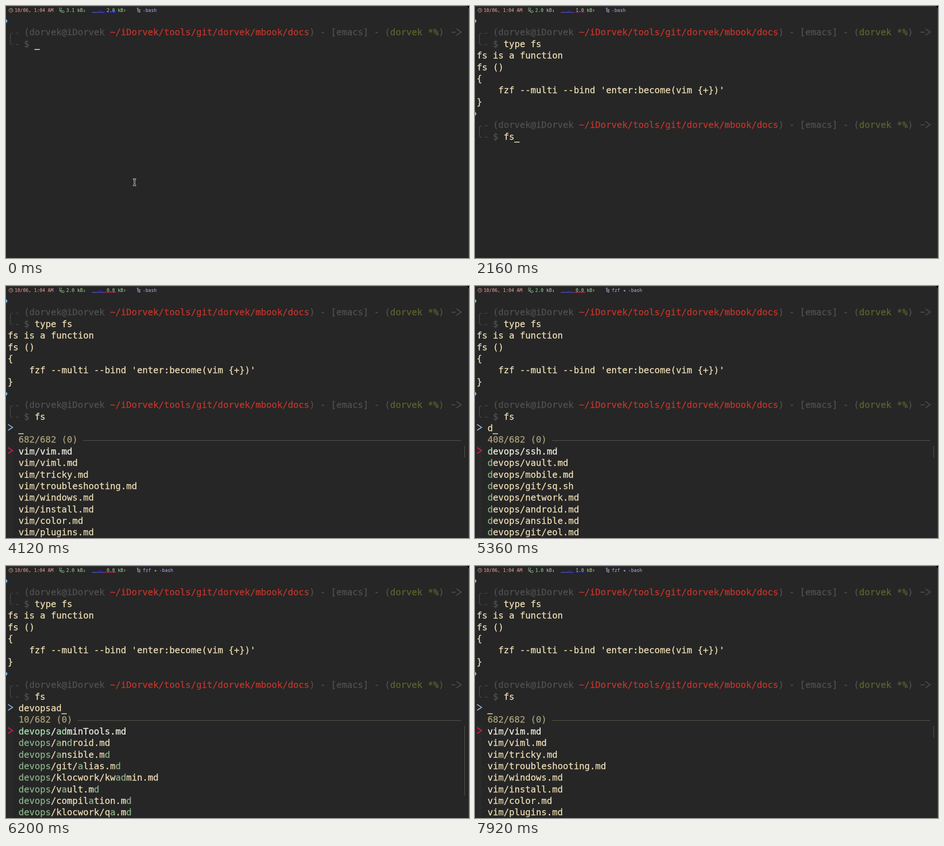
These frames come from a looping animation (1014x552 px, 8 s). An HTML page:

```html
<!DOCTYPE html>
<html lang="en">
<head>
<meta charset="utf-8">
<title>Terminal</title>
<style>
  html, body { margin: 0; width: 100%; height: 100%; overflow: hidden; background: #000; }
  svg { display: block; width: 1014px; height: 552px; }
  text { font: 19.6px "DejaVu Sans Mono", monospace; white-space: pre; stroke-width: .35px; }
  .small { font-size: 10.05px; stroke-width: 0; }
</style>
</head>
<body>
<svg id="stage" viewBox="0 0 1014 552"></svg>
<script>
const LOOP = 8000, CELL = 11.8, LEFT = 3.8, ROW = 25.37, BASE = 64.4;
const color = {
  back: '#262626', dim: '#505050', path: '#c0352b', branch: '#5f612d', text: '#ebdbb2',
  bright: '#ecece0', info: '#a8a077', match: '#87af87', matchBright: '#a9dfae',
  prompt: '#87afd7', pointer: '#d2185c', date: '#f3a69b', net: '#a6d9a0', job: '#b5b5ef', rule: '#5c5c50'
};

const vimFiles = ['vim', 'viml', 'tricky', 'troubleshooting', 'windows', 'install', 'color', 'plugins']
  .map(name => `vim/${name}.md`);
const opsFiles = ['ssh.md', 'vault.md', 'mobile.md', 'git/sq.sh', 'network.md', 'android.md', 'ansible.md', 'git/eol.md']
  .map(name => `devops/${name}`);
const adFiles = ['adminTools', 'android', 'ansible', 'git/alias', 'klocwork/kwadmin', 'vault', 'compilation', 'klocwork/qa']
  .map(name => `devops/${name}.md`);

// Each table holds [start in ms, value].
const typedFirst = [[0, ''], [240, 't'], [340, 'ty'], [430, 'typ'], [520, 'type'], [600, 'type '], [720, 'type f'], [800, 'type fs']];
const typedSecond = [[0, ''], [1960, 'f'], [2080, 'fs']];
const query = [[0, ''], [5000, 'd'], [5520, 'de'], [5640, 'dev'], [5720, 'devo'], [5800, 'devop'],
  [5880, 'devops'], [6000, 'devopsa'], [6120, 'devopsad'], [7760, '']];
const results = [[0, [682, vimFiles, 1]], [5040, [408, opsFiles, 1]], [5560, [226, opsFiles, 1]],
  [5680, [73, opsFiles, 1]], [5840, [64, opsFiles, 1]], [6040, [26, adFiles, 2]],
  [6160, [10, adFiles, 6]], [7800, [682, vimFiles, 1]]];
const network = [[0, ['3.1', '2.0', '#2323c8']], [480, ['1.0', '1.0', '#23237e']], [1480, ['2.0', '1.0', '#762160']],
  [2480, ['2.0', '0.0', '#c52b58']], [7360, ['1.0', '1.0', '#232391']]];
const ENTER_FIRST = 960, OUTPUT = 1040, PROMPT = 1240, ENTER_SECOND = 3680, FINDER = 3760, JOB = 4280;

const at = (table, t) => table.filter(step => step[0] <= t).pop()[1];
const col = n => LEFT + n * CELL;
const baseline = row => BASE + row * ROW;
const rect = (x, y, w, h, fill) => `<rect x="${x}" y="${y}" width="${w}" height="${h}" fill="${fill}"/>`;
const stroke = (d, tint, width = 1) => `<path d="${d}" fill="none" stroke="${tint}" stroke-width="${width}"/>`;
const text = (x, y, parts, cls = '') => `<text x="${x}" y="${y}" class="${cls}">` +
  parts.map(([tint, s]) => `<tspan fill="${tint}" stroke="${tint}">${s}</tspan>`).join('') + '</text>';
const line = (row, column, s, tint = color.text) => text(col(column), baseline(row), [[tint, s]]);
const small = (x, s, tint) => text(x, 13, [[tint, s]], 'small');
const cursor = (row, column) => rect(col(column) - .4, baseline(row) + 4.6, 11.6, 1.8, color.text);

function chrome() {
  return rect(0, 0, 1014, 552, '#000') +
    `<path d="M-2 .5H1004Q1013.5 .5 1013.5 10V554H-2Z" fill="${color.back}" stroke="#484848"/>`;
}

function statusBar(t) {
  const [down, up, tail] = at(network, t);
  return `<circle cx="10.8" cy="9.3" r="4.3" fill="none" stroke="${color.date}"/>` +
    stroke('M10.8 6.5V9.5H13', color.date) + small(19, '10/06, 1:04 AM', color.date) +
    stroke('M117 4.5h4.5v4H117zM122.5 10.5h4.5v4h-4.5zM119 9v3.5h3M116.5 10.5h5', '#82ad80') +
    small(132, `${down} kB↓`, color.net) +
    rect(188, 13.4, 27, 1.2, '#5d5ddd') + rect(215, 13.4, 27, 1.2, tail) +
    rect(203, 10, 5, 4, '#2222d2') + rect(211, 9.5, 1.5, 4.5, '#2222a0') +
    (t < 480 ? rect(231, 10, 3, 4, '#2222b8') + rect(236, 9, 4, 5, '#2222b8') : '') +
    small(220.5, `${up} kB↑`, color.net) +
    `<g fill="none" stroke="${color.job}"><circle cx="288.5" cy="5.5" r="1.4"/>` +
    '<circle cx="292.7" cy="8.7" r="1.3"/><circle cx="292.7" cy="12.6" r="1.3"/>' +
    '<path d="M288.5 7V12.6H291.4M288.5 8.7H291.4"/></g>' +
    small(299.5, t < JOB ? '-bash' : 'fzf ◂ -bash', color.job);
}

function shellPrompt(row, typed) {
  const y = row * ROW;
  return `<path d="M0 ${y + 28}L3.5 ${y + 33}L0 ${y + 38}Z" fill="#79b9f4"/>` +
    stroke(`M15 ${y + 59.5}Q9.5 ${y + 59.5} 9.5 ${y + 65}V${y + 80}Q9.5 ${y + 84.5} 15 ${y + 84.5}` +
      `M21.5 ${y + 59.5}h6M21.5 ${y + 84.5}h6`, color.dim, 1.2) +
    text(col(3), baseline(row), [
      [color.dim, '(dorvek@iDorvek '], [color.path, '~/iDorvek/tools/git/dorvek/mbook/docs'],
      [color.dim, ') - [emacs] - ('], [color.branch, 'dorvek *%'], [color.dim, ')']]) +
    stroke(`M975.5 ${y + 57.5}h9M986.5 ${y + 50}L997 ${y + 57}L986.5 ${y + 64}`, color.dim, 1.8) +
    line(row + 1, 3, '$', color.dim) + line(row + 1, 5, typed);
}

// Marks the letters of the query in order, as a fuzzy finder does.
function fuzzy(name, letters, selected) {
  let next = 0;
  return [...name].map(ch => {
    const hit = ch === letters[next];
    if (hit) next++;
    return [hit ? (selected ? color.matchBright : color.match) : (selected ? color.bright : color.text), ch];
  });
}

function chevron(row, tint) {
  const y = baseline(row) - 8.4;
  return stroke(`M4.5 ${y - 6.5}L14.5 ${y}L4.5 ${y + 6.5}`, tint, 2);
}

function finder(t) {
  const typed = at(query, t);
  const [count, files, barRows] = at(results, t);
  const info = `${count}/682 (0)`;
  const ruleX = col(info.length + 3) - 0.5;
  return rect(3.5, 349, 12, 203, '#292929') +
    chevron(10, color.prompt) + line(10, 2, typed) +
    line(11, 2, info, color.info) + stroke(`M${ruleX} 338.5H997`, color.rule) +
    chevron(12, color.pointer) +
    files.map((name, i) => text(col(2), baseline(12 + i), fuzzy(name, files === vimFiles ? '' : typed, i === 0))).join('') +
    stroke(`M1004.5 350.5v${barRows * ROW}`, color.rule) + cursor(10, 2 + typed.length);
}

function pointerBeam() {
  const d = 'M278 379Q281.5 379 281.5 382Q281.5 379 285 379M281.5 382V390M278 393Q281.5 393 281.5 390Q281.5 393 285 393M279.5 386h4';
  return stroke(d, '#dedede', 3) + stroke(d, '#111', 1.2);
}

function terminal(t) {
  const first = at(typedFirst, t), second = at(typedSecond, t);
  let out = shellPrompt(0, first);
  if (t < 240) out += pointerBeam();
  if (t < ENTER_FIRST) return out + cursor(1, 5 + first.length);
  if (t < OUTPUT) return out + cursor(2, 0);
  out += ['fs is a function', 'fs ()', '{', "    fzf --multi --bind 'enter:become(vim {+})'", '}']
    .map((s, i) => line(2 + i, 0, s)).join('');
  if (t < PROMPT) return out + cursor(7, 0);
  out += shellPrompt(8, second);
  if (t < ENTER_SECOND) return out + (t >= 2840 && t < 3360 ? '' : cursor(9, 5 + second.length));
  return out + (t < FINDER ? cursor(10, 0) : finder(t));
}

const stage = document.getElementById('stage');
const begin = performance.now();
let shown = '';
function draw() {
  const t = (performance.now() - begin) % LOOP;
  const picture = chrome() + statusBar(t) + terminal(t);
  if (picture !== shown) stage.innerHTML = shown = picture;
  requestAnimationFrame(draw);
}
draw();
</script>
</body>
</html>
```
